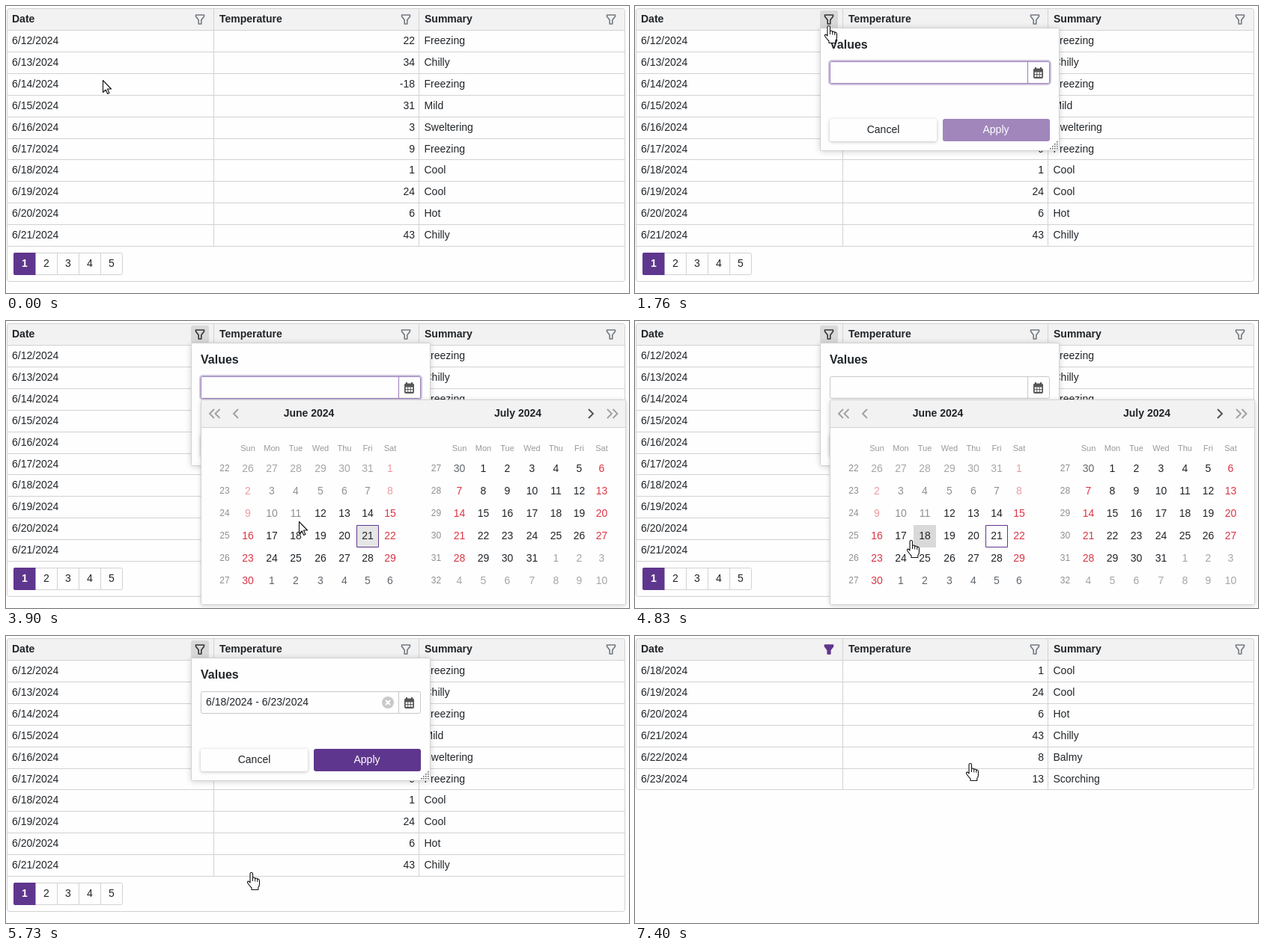
Animation, 832 px wide and 384 px high, one loop 9660 ms. Source, as an HTML page with a canvas:

```html
<!DOCTYPE html>
<html lang="en">
<head>
<meta charset="utf-8">
<title>Grid date filter</title>
<style>
html, body { margin: 0; width: 100%; height: 100%; overflow: hidden; background: #fefefe; }
canvas { display: block; }
</style>
</head>
<body>
<canvas id="stage" width="832" height="384"></canvas>
<script>
const ctx = document.getElementById('stage').getContext('2d');
const LOOP = 9660;
const INK = '#212529', PURPLE = '#5f368d', LINE = '#d2d2d2', PAPER = '#fefefe', HEAD = '#f2f2f2';
const POPUP_OPEN = 1760, CAL_OPEN = 3000, START_PICKED = 4300, RANGE_PICKED = 5700,
      REFOCUS = 5760, APPLY_CLICK = 7260, FILTERED = 7400;

const TEMPS = [22, 34, -18, 31, 3, 9, 1, 24, 6, 43, 8, 13];
const SUMMARIES = ('Freezing Chilly Freezing Mild Sweltering Freezing ' +
  'Cool Cool Hot Chilly Balmy Scorching').split(' ');
const ROWS = TEMPS.map((temp, i) => [`6/${12 + i}/2024`, temp, SUMMARIES[i]]);

// Cursor keys: time, x, y of the tip
const PATH = [
  [0, 129, 99], [800, 129, 99], [1160, 245, 46], [1330, 259, 26],
  [2230, 259, 26], [2760, 400, 81], [3430, 400, 81], [3900, 391, 268], [4030, 381, 281],
  [4700, 381, 281], [4830, 369, 293], [5130, 328, 316],
  [6230, 328, 316], [6860, 448, 170], [LOOP, 448, 170]
];
const DAY_X = [323, 355, 387, 420, 452, 483, 513];
const WEEKDAYS = ['Sun', 'Mon', 'Tue', 'Wed', 'Thu', 'Fri', 'Sat'];

const ARROW = new Path2D('M.5 .5V16.5L4.2 13L6.6 18.5L8.9 17.5L6.5 12H11.5Z');
const HAND = new Path2D('M-2 14V2Q-2 .5-.3 .5Q1.5 .5 1.5 2V8.5Q1.5 7 3 7Q4.5 7 4.7 9Q5 7.8 6.2 8' +
  'Q7.8 8.2 7.8 10Q8 9 9.2 9.2Q10.5 9.5 10.5 11.5V16Q10.5 18.5 8.8 20.5V23.5H0V21' +
  'Q-2.5 18.5-5.3 14.5Q-6 13-5 12.2Q-3.8 11.6-2 14Z');
const KNUCKLES = new Path2D('M1.5 8.5V12M4.7 9V12.5M7.8 10V13');
const FUNNEL = new Path2D('M-5.5-6H5.5V-4L1.8 .8V6H-1.8V.8L-5.5-4Z');

function text(str, x, y, { color = INK, size = 14, bold = false, align = 'left' } = {}) {
  ctx.font = `${bold ? 'bold ' : ''}${size}px "Liberation Sans", Arial, sans-serif`;
  ctx.textAlign = align;
  ctx.fillStyle = color;
  ctx.fillText(str, x, y);
}

function rect(x, y, w, h, color) {
  ctx.fillStyle = color;
  ctx.fillRect(x, y, w, h);
}

function box(x, y, w, h, r, fill, stroke, lineWidth = 1) {
  ctx.beginPath();
  ctx.roundRect(x, y, w, h, r);
  if (fill) { ctx.fillStyle = fill; ctx.fill(); }
  if (stroke) strokePath(stroke, lineWidth);
}

function strokePath(color, width, path) {
  ctx.strokeStyle = color;
  ctx.lineWidth = width;
  path ? ctx.stroke(path) : ctx.stroke();
}

function shadowed(blur, dy, alpha, draw) {
  ctx.save();
  ctx.shadowColor = `rgba(0,0,0,${alpha})`;
  ctx.shadowBlur = blur;
  ctx.shadowOffsetY = dy;
  draw();
  ctx.restore();
}

function at(x, y, draw) {
  ctx.save();
  ctx.translate(x, y);
  draw();
  ctx.restore();
}

// Monotone cubic interpolation: rests stay still, moves ease in and out
function cursorAt(t) {
  const i = Math.min(PATH.findIndex(key => key[0] > t), PATH.length - 1) - 1;
  const [a, b] = [PATH[i], PATH[i + 1]];
  const span = b[0] - a[0], u = (t - a[0]) / span;
  return [1, 2].map(axis => {
    const slope = j => PATH[j] && PATH[j + 1]
      ? (PATH[j + 1][axis] - PATH[j][axis]) / (PATH[j + 1][0] - PATH[j][0]) : 0;
    const tangent = j => {
      const p = slope(j - 1), q = slope(j);
      return p * q > 0 ? 2 * p * q / (p + q) : 0;
    };
    const ease = u * u * (3 - 2 * u);
    return a[axis] + (b[axis] - a[axis]) * ease
      + span * u * (1 - u) * ((1 - u) * tangent(i) - u * tangent(i + 1));
  });
}

const overFunnel = (x, y) => x > 247 && x < 271 && y < 29.5;
const overApply = (x, y) => x > 411 && x < 554 && y > 151 && y < 181;
const overTitle = (x, y) => x > 371 && x < 438 && y > 112 && y < 136;

function juneDayAt(x, y) {
  const col = DAY_X.findIndex(cx => Math.abs(x - cx) <= 16);
  const day = Math.floor((y - 183) / 30) * 7 + col - 5;
  return col >= 0 && day >= 12 && day <= 30 ? day : 0;
}

function drawFunnel(x, color, filled) {
  at(x, 18, () => {
    ctx.lineJoin = 'round';
    if (filled) { ctx.fillStyle = color; ctx.fill(FUNNEL); }
    strokePath(color, 1.6, FUNNEL);
  });
}

function drawGrid(t, x, y) {
  const filtered = t >= FILTERED;
  const rows = filtered ? ROWS.slice(6) : ROWS.slice(0, 10);
  const lineY = k => Math.round(32 + 28.9 * k);
  const end = lineY(rows.length);

  box(1.5, 3.5, 825, (filtered ? end : 368) - 3, 3, PAPER);
  box(1.5, 3.5, 825, 29, [3, 3, 0, 0], HEAD);
  rows.forEach(([date, temp, summary], k) => {
    rect(1, lineY(k), 826, 1, LINE);
    const base = lineY(k) + 19;
    text(date, 8, base);
    text(String(temp).replace('-', '-'), 546, base, { align: 'right' });
    text(summary, 558.5, base);
  });
  if (!filtered) rect(1, end, 826, 1, LINE);
  for (const colX of [277, 551]) rect(colX, 4, 1, end - 4, LINE);
  box(1.5, 3.5, 825, (filtered ? end : 368) - 3, 3, null, LINE);

  text('Date', 8, 22, { bold: true });
  text('Temperature', 285, 22, { bold: true });
  text('Summary', 559, 22, { bold: true });
  const active = !filtered && (t >= POPUP_OPEN || overFunnel(x, y));
  if (active) box(247, 6, 24, 24, 3, '#d9d9d9');
  drawFunnel(259, filtered ? PURPLE : active ? '#333' : '#737980', filtered);
  drawFunnel(534, '#737980');
  drawFunnel(808, '#737980');
  if (!filtered) drawPager();
}

function drawPager() {
  box(10.5, 330.5, 145, 29, 2, PAPER, LINE);
  box(10, 330, 29.5, 30, [2, 0, 0, 2], PURPLE);
  for (let i = 0; i < 5; i++) {
    if (i > 1) rect(10 + 29 * i, 331, 1, 29, LINE);
    text(i + 1, 25 + 29 * i, 349, { align: 'center', bold: !i, color: i ? INK : 'white' });
  }
}

function drawCalendarIcon() {
  box(532, 83.5, 13, 13.5, 2, '#555');
  rect(534, 82, 2, 2, '#555');
  rect(541, 82, 2, 2, '#555');
  for (let i = 0; i < 6; i++)
    rect(533.7 + i % 3 * 3.5, 88.5 + Math.floor(i / 3) * 3.7, 2.6, 2.6, PAPER);
}

function drawPopup(t, x, y) {
  const hasRange = t >= RANGE_PICKED;
  const focused = t < START_PICKED || (t >= REFOCUS && t < APPLY_CLICK);

  shadowed(9, 1, 0.2, () => box(247.5, 29.5, 319, 164, 2, PAPER));
  box(247.5, 29.5, 319, 164, 2, null, LINE);
  text('Values', 260, 57, { bold: true, size: 16 });

  if (focused) box(259, 73, 296, 32, 4, null, 'rgba(95,54,141,.3)', 2);
  const border = focused ? '#9a80bb' : '#c8c8c8';
  box(260.5, 74.5, 293, 29, 2, PAPER, border);
  rect(524, 75, 1, 29, border);
  drawCalendarIcon();
  if (hasRange) {
    text('6/18/2024 - 6/23/2024', 267, 93);
    box(502, 81, 16, 16, 8, '#c9c9c9');
    strokePath('white', 2, new Path2D('M507 86l6 6m0-6l-6 6'));
  }

  shadowed(4, 1, 0.25, () => box(260, 151, 143, 30, 3, PAPER));
  text('Cancel', 331.5, 170, { align: 'center' });
  const applyColor = !hasRange ? '#a086bb' : overApply(x, y) ? '#512e78' : PURPLE;
  box(411, 151, 143, 30, 3, applyColor);
  text('Apply', 482, 170, { align: 'center', color: 'white' });

  for (let row = 0; row < 4; row++)
    for (let col = 3 - row; col < 4; col++)
      rect(554 + col * 3, 181 + row * 3, 1.6, 1.6, '#666');
}

function dayColor(date, month) {
  const enabled = date >= new Date(2024, 5, 12) && date < new Date(2024, 7, 1);
  const weekend = date.getDay() % 6 === 0;
  if (date.getMonth() !== month) return enabled ? '#62676c' : '#a6a6a6';
  if (weekend) return enabled ? '#dc3545' : '#ed9aa2';
  return enabled ? INK : '#8e9194';
}

function drawMonth(month, firstDate, firstWeek, dx) {
  WEEKDAYS.forEach((name, c) =>
    text(name, DAY_X[c] + dx, 174, { size: 11, color: '#9a9a9a', align: 'center' }));
  for (let i = 0; i < 42; i++) {
    const row = Math.floor(i / 7), col = i % 7;
    const date = new Date(2024, firstDate[0], firstDate[1] + i);
    if (!col) text(firstWeek + row, 292 + dx, 201 + 30 * row, { size: 12, color: '#8e8e8e', align: 'center' });
    text(date.getDate(), DAY_X[col] + dx, 202 + 30 * row, { color: dayColor(date, month), align: 'center' });
  }
}

function drawCalendar(t, x, y) {
  shadowed(6, 1, 0.2, () => box(260.5, 105.5, 567, 274, 2, PAPER));
  box(260.5, 105.5, 567, 37, [2, 2, 0, 0], HEAD);
  rect(261, 142, 566, 1, LINE);
  box(260.5, 105.5, 567, 274, 2, null, LINE);

  const titleColor = overTitle(x, y) ? PURPLE : INK;
  text('June 2024', 404.5, 128, { bold: true, align: 'center', color: titleColor });
  text('July 2024', 683.5, 128, { bold: true, align: 'center', color: titleColor });
  ctx.lineJoin = 'miter';
  strokePath('#a0a0a0', 1.9, new Path2D(
    'M278 118l-6 6l6 6M285.5 118l-6 6l6 6M310 118l-6 6l6 6M803 118l6 6l-6 6M810.5 118l6 6l-6 6'));
  strokePath('#555', 2, new Path2D('M778 118l6 6l-6 6'));

  const hovered = juneDayAt(x, y);
  const last = Math.max(hovered, t >= START_PICKED ? 18 : 0);
  for (let day = 18; day <= last; day++) {
    const cell = day + 5;
    rect(DAY_X[cell % 7] - 15, 183 + 30 * Math.floor(cell / 7), 30, 30,
      day === 18 || day === last ? '#d9d9d9' : '#e8e8e8');
  }
  box(468.5, 273.5, 29, 29, 0, t < START_PICKED ? '#e5e5e5' : null, PURPLE);

  drawMonth(5, [4, 26], 22, 0);
  drawMonth(6, [5, 30], 27, 282.5);
}

function drawCursor(t, x, y) {
  const isHand = t < CAL_OPEN ? overFunnel(x, y)
    : t <= 6230 ? juneDayAt(x, y) || overTitle(x, y)
    : overApply(x, y);
  const shape = isHand ? HAND : ARROW;
  at(Math.round(x), Math.round(y), () => {
    ctx.lineJoin = 'round';
    ctx.fillStyle = 'white';
    ctx.fill(shape);
    strokePath('#111', 1.1, shape);
    if (isHand) strokePath('#111', 1, KNUCKLES);
  });
}

function frame() {
  const t = performance.now() % LOOP;
  const [x, y] = cursorAt(t);
  rect(0, 0, 832, 384, PAPER);
  drawGrid(t, x, y);
  if (t >= POPUP_OPEN && t < FILTERED) drawPopup(t, x, y);
  if (t >= CAL_OPEN && t < RANGE_PICKED) drawCalendar(t, x, y);
  drawCursor(t, x, y);
  requestAnimationFrame(frame);
}
frame();
</script>
</body>
</html>
```
